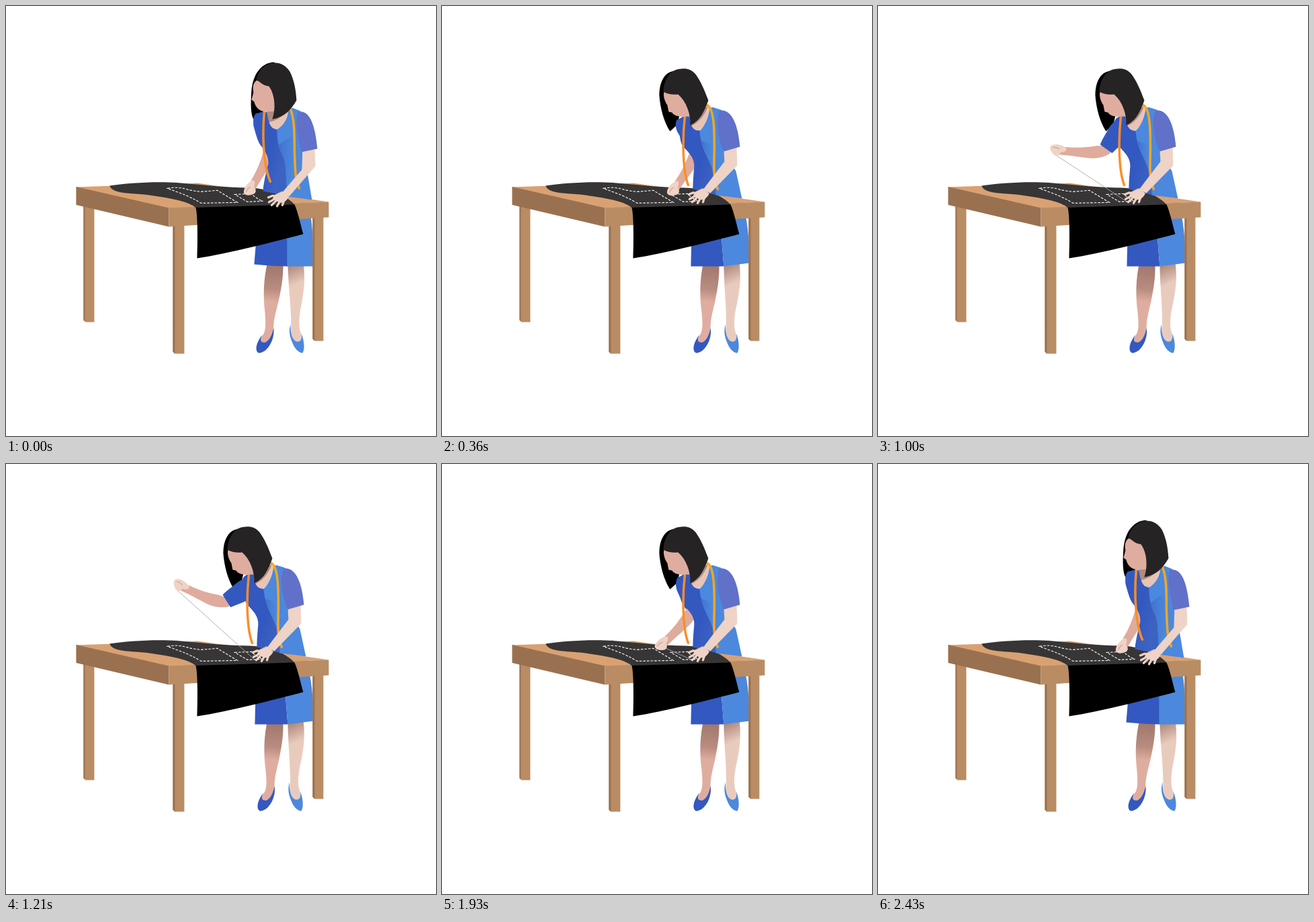
An HTML page that plays this animation: 640x640 px, repeating every 2500 ms.

```html
<!DOCTYPE html>
<html lang="en">
<head>
<meta charset="utf-8">
<title>Dressmaker at work</title>
<style>
html, body { margin: 0; width: 100%; height: 100%; overflow: hidden; background: #fff; }
svg { display: block; width: 100vw; height: 100vh; }
</style>
</head>
<body>
<svg viewBox="-.4 -.4 640 640">
  <defs>
    <linearGradient id="shadeL" gradientUnits="userSpaceOnUse" x1="400" y1="385" x2="394" y2="440">
      <stop offset="0" stop-color="#a1776c"/><stop offset=".65" stop-color="#b98c80"/><stop offset="1" stop-color="#dfada0"/>
    </linearGradient>
    <linearGradient id="shadeR" gradientUnits="userSpaceOnUse" x1="426" y1="386" x2="437" y2="412">
      <stop offset="0" stop-color="#b08b7e"/><stop offset="1" stop-color="#e9cbbe"/>
    </linearGradient>
    <linearGradient id="bodice" gradientUnits="userSpaceOnUse" x1="388" y1="222" x2="414" y2="230">
      <stop offset="0" stop-color="#3358c0"/><stop offset="1" stop-color="#3d63c2"/>
    </linearGradient>
    <linearGradient id="fold" x1="0" y1=".4" x2="1" y2=".6">
      <stop offset="0" stop-color="#3d69c6" stop-opacity=".75"/><stop offset="1" stop-color="#4c88dd" stop-opacity="0"/>
    </linearGradient>
  </defs>

  <g id="legL">
    <path fill="url(#shadeL)" d="M389 380H412C413 405 408 425 405 440C400 460 397 470 398 484C396 494 390 502 380 502C376 500 378 494 382 489C387 482 386 470 385 455C382 430 383 405 389 380Z"/>
    <path fill="#3358c0" d="M398 479C400 497 388 516 376 516C369 514 372 500 381 489C376 499 380 501 386 500C393 496 396 487 398 479Z"/>
  </g>
  <g id="legR">
    <path fill="url(#shadeR)" d="M419 380H442C445 402 444 418 440 440C436 458 435 470 437 482C441 492 441 500 434 501C426 499 423 490 424 474C424 445 419 410 419 380Z"/>
    <path fill="#4c88dd" d="M423 473C420 485 422 492 426 501C430 511 436 516 441 516C445 510 443 495 439 487C441 497 437 500 432 499C425 496 423 486 423 473Z"/>
  </g>
  <g id="skirt"></g>
  <g id="hair"></g>

  <g id="table">
    <path fill="#ba8c63" d="M115 290H131V470H118L115 467ZM248 320H265V517H251L248 514ZM456 305H472V498H459L456 495Z"/>
    <path fill="#9a7150" d="M115 290H117V469L115 467ZM248 320H251V517L248 514ZM456 305H459V498L456 495Z"/>
    <path fill="#d9a172" d="M104 269L285 263L480 291L242 301Z"/>
    <path fill="#9a7150" d="M104 268.500L242 300V328L104 295.500Z"/>
    <path fill="#ba8c63" d="M242 300L480 291V314L242 328Z"/>
    <path fill="#373535" d="M154 267C180 263 225 260 260 263C295 266 330 270 360 270C395 271 418 283 429 295V296L283 300.500C270 289 235 284 205 280C180 278 157 278 154 267Z"/>
    <path d="M282 299.500L429 295C434 305 438 325 442 339C400 350 330 368 284 375C285 350 285 310 282 299.500Z"/>
    <g fill="none" stroke="#fff" stroke-width="1.100" stroke-dasharray="3.600 2">
      <path d="M240 271C262 267 265 274 290 276L314 274L344 292L290 293C270 281 255 277 240 271Z"/>
      <path d="M340 280L365 279C371 285 376 288 382 290L359 291Z"/>
    </g>
  </g>

  <line id="thread" stroke="#a9aaa8" stroke-width=".9"/>
  <g id="forearm">
    <path fill="#dfab9d" d="M-4 -9L17 -8C35 -4 50 -3 64 -4L76 8C60 8 45 10 27 11C12 11 2 6 -3 2Z"/>
    <path fill="#eed3c6" d="M62 -1C67 -7 81 -9 86 -4C88 0 85 5 80 9C76 12 72 9 71 5C68 4 62 3 62 -1Z"/>
    <path fill="none" stroke="#d8a596" stroke-width="1.300" d="M83 -2C78 -3 75 -2 73 0"/>
  </g>
  <path id="sleeve" fill="#3358c0" d="M2 -12C-4 -10 -9 -4 -11 6C-13 18 -15 28 -15 34L6 40L16 20L14 -8Z"/>
  <g id="front"></g>
  <g id="hand" fill="none" stroke="#eed3c6" stroke-linecap="round" stroke-linejoin="round">
    <path fill="#eed3c6" stroke-width="1" d="M411 276L420 283C417 290 411 294 405 291L397 286L400 281Z"/>
    <path stroke-width="3.200" d="M404 283L396 282L390 284.500M403 285L391 291.500M404 287L395 296M408 289L403 297.500M414 287L411 296"/>
  </g>
  <g id="head"></g>
</svg>
<script>
const $ = id => document.getElementById(id);
const lerp = (a, b, u) => a + (b - a) * u;
const clamp = x => Math.max(0, Math.min(1, x));
const ease = x => { x = clamp(x); return x * x * (3 - 2 * x); };

// Parts that change shape: group, colour, upright path, leaning path, stroke width
const parts = [
  ['skirt', '#3358c0', 'M376 300L369 384Q400 387 419 387L418 300Z', 'M372 300L370 387Q400 387 419 387L412 300Z'],
  ['skirt', '#4c88dd', 'M418 300L451 300C456 325 457 350 457 387L418 387Z', 'M412 300L449 300C456 330 457 355 457 382L419 387Z'],
  ['hair', '#000', 'M399 83C378 84 367 103 365 125C364 140 363 160 368 168L382 160L400 120Z',
    'M346 96C329 98 323 115 323 132C324 150 330 173 339 186L350 176L360 130Z'],
  ['front', '#e8c4b6', 'M388 154L388 170C392 186 408 186 414 174L421 154Z', 'M366 162L367 178C372 188 386 188 392 174L399 150Z'],
  ['front', '#b08a7b', 'M388 154L389 173C400 171 411 165 417 156Z', 'M366 162L368 179C379 175 389 166 396 148Z'],
  ['front', 'url(#bodice)',
    'M388 157L382 159C374 164 367 169 368 178C372 192 374 200 378 206C386 217 390 222 390 234C387 246 383 262 382 275L420 283L420 200L403 183C395 184 390 175 388 157Z',
    'M368 163L359 164C351 167 350 173 352 184C354 194 354 202 358 208C368 219 375 225 375 238C374 249 373 262 373 272L409 281L402 210L383 185C375 186 369 180 368 163Z'],
  ['front', '#4c88dd',
    'M403 183C413 178 418 168 420 155L426 151L438 156L441 217L448 247L455 288L418 283C416 255 417 238 413 226C405 210 403 200 403 183Z',
    'M383 185C391 179 396 165 398 152L402 150L415 154L420 217L437 245L446 286L407 281C407 260 404 245 397 230C388 212 384 200 383 185Z'],
  ['front', 'url(#fold)', 'M404 207L424 193L438 225L417 268C416 250 417 238 413 226Z', 'M385 200L399 205L405 250L407 270C407 256 404 245 397 230Z'],
  ['front', '#f98f28', 'M384 157C381 190 382 235 393 261', 'M361 165C357 200 358 245 366 266', 3.5],
  ['front', '#f7a61f', 'M422 151C429 165 429 190 429 215C430 245 430 257 436 271', 'M394 147C405 152 405 185 405 215C404 245 404 259 410 272', 3.5],
  ['front', '#eed3c6', 'M441 213L459 209L460 238L421 283L410 278L440 243Z', 'M419 212L438 206L439 237L399 278L388 273L420 231Z'],
  ['front', '#6170c9', 'M435 157C452 154 460 178 463 212L439 217C437 200 427 170 435 157Z', 'M413 155C431 153 440 176 443 209L419 216C411 198 406 172 413 155Z'],
  ['head', '#dfada0',
    'M376 109C368 111 366 119 368 128L365 139L369 142C371 151 378 157 388 157L400 156L400 125L388 110Z',
    'M331 126C328 130 330 140 335 147L337 157L342 158C345 163 353 165 361 164L370 164L367 140L350 129Z'],
  ['head', '#262324',
    'M399 84C384 85 374 97 372 110C378 111 380 118 391 119C399 130 402 150 396 168C414 165 424 154 432 140C431 122 428 109 422 97C416 88 409 84 399 84Z',
    'M356 93C340 93 330 108 329 127C336 131 343 132 351 131C363 141 370 160 369 177C383 171 390 157 396 140C390 124 385 112 377 101C371 94 364 92 356 93Z']
].map(([group, paint, a, b, width]) => {
  const el = document.createElementNS('http://www.w3.org/2000/svg', 'path');
  el.setAttribute('fill', width ? 'none' : paint);
  if (width) {
    el.setAttribute('stroke', paint);
    el.setAttribute('stroke-width', width);
    el.setAttribute('stroke-linecap', 'round');
  }
  $(group).append(el);
  return { el, a, b: b.match(/[\d.]+/g).map(Number) };
});

// Sewing arm: step, upper arm angle, forearm angle (degrees from straight down)
const armKeys = [
  [0, -33, 28], [3, -46, 27], [5, -44, 32], [7, -37, 42], [9, -23.5, 55], [14, 20, 93], [16, 40, 111], [17, 42, 113],
  [23, 42, 113], [24, 31, 102], [25, 5, 80], [26, -24, 55], [28, -44, 32], [30, -46, 27], [34, -33, 28], [35, -33, 28]
];
const LOOP = 2500, STEPS = 35, UPPER = 40, RAD = Math.PI / 180;

function armAt(n) {
  const i = armKeys.findIndex(k => k[0] > n);
  const p = armKeys[i - 1], q = armKeys[i];
  const u = (n - p[0]) / (q[0] - p[0]);
  return [lerp(p[1], q[1], u), lerp(p[2], q[2], u)];
}

function setLeg(id, shift) {
  const k = shift / 130;
  $(id).setAttribute('transform', `matrix(1 0 ${k} 1 ${-385 * k} 0)`);
}

function draw(ms) {
  const n = Math.floor((ms + 5) / (LOOP / STEPS)) % STEPS;
  const lean = n < 20 ? ease(n / 5) : 1 - ease((n - 27.8) / 6.2);

  for (const { el, a, b } of parts) {
    let i = 0;
    el.setAttribute('d', a.replace(/[\d.]+/g, v => lerp(+v, b[i++], lean).toFixed(2)));
  }
  setLeg('legL', 2 * lean);
  setLeg('legR', -2 * lean);
  $('hand').setAttribute('transform', `translate(${-23 * lean} ${-4.5 * lean})`);

  // The head swings along a shallow arc
  const lift = `translate(0 ${-7 * lean * (1 - lean)})`;
  $('head').setAttribute('transform', lift);
  $('hair').setAttribute('transform', lift);

  const [upper, lower] = armAt(n);
  const sx = lerp(376, 356, lean), sy = lerp(171, 179, lean);
  const ex = sx - UPPER * Math.sin(upper * RAD), ey = sy + UPPER * Math.cos(upper * RAD);
  const s = Math.sin(lower * RAD), c = Math.cos(lower * RAD);
  $('sleeve').setAttribute('transform', `translate(${sx} ${sy}) rotate(${upper})`);
  $('forearm').setAttribute('transform', `matrix(${-s} ${c} ${c} ${s} ${ex} ${ey})`);

  const ends = { x1: ex - 76 * s + 10 * c, y1: ey + 76 * c + 10 * s, x2: 368, y2: 289.5 };
  for (const k in ends) $('thread').setAttribute(k, ends[k]);
  $('thread').style.display = n > 5 && n < 28 ? '' : 'none';
}

const start = performance.now();
function tick() {
  draw((performance.now() - start) % LOOP);
  requestAnimationFrame(tick);
}
tick();
</script>
</body>
</html>
```
